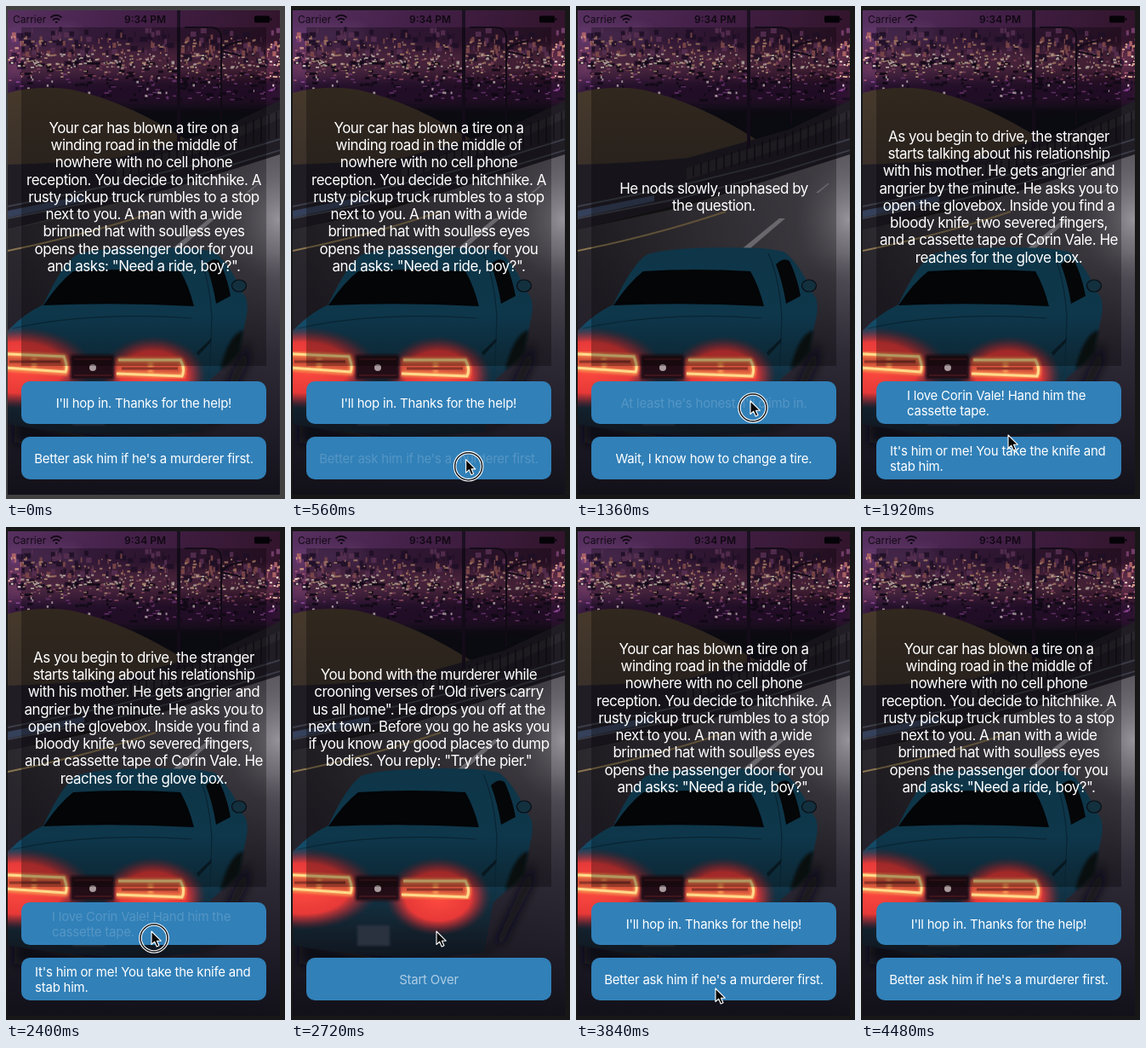
Animation of 328 by 578 pixels, one loop 4.8 s. Source, as an HTML page:

```html
<!DOCTYPE html>
<html lang="en">
<head>
<meta charset="utf-8">
<title>Hitchhike story</title>
<style>
html, body { margin: 0; width: 100%; height: 100%; overflow: hidden; background: #171717; }
svg { display: block; width: 328px; height: 578px; font-family: Inter, Roboto, sans-serif; }
.label { font-size: 17px; letter-spacing: -.5px; fill: #fff; text-anchor: middle; }
.title { font-size: 15px; letter-spacing: -.23px; fill: #fff; }
.status { font-size: 12px; fill: #08050b; }
</style>
</head>
<body>
<svg id="stage" viewBox="0 0 328 578" xmlns="http://www.w3.org/2000/svg">
  <defs>
    <clipPath id="screen"><rect x="2" y="5" width="320" height="568"/></clipPath>
    <linearGradient id="sky" x2="1" y2=".25">
      <stop offset="0" stop-color="#57305f"/><stop offset=".45" stop-color="#432048"/>
      <stop offset="1" stop-color="#31142a"/>
    </linearGradient>
    <linearGradient id="hill" x2="0" y2="1">
      <stop offset="0" stop-color="#46392b"/><stop offset="1" stop-color="#332b29"/>
    </linearGradient>
    <linearGradient id="road" gradientUnits="userSpaceOnUse" x1="20" y1="320" x2="322" y2="230">
      <stop offset="0" stop-color="#2a272d"/><stop offset=".5" stop-color="#444048"/><stop offset="1" stop-color="#5c5961"/>
    </linearGradient>
    <linearGradient id="dusk" x2="0" y2="1">
      <stop offset="0" stop-color="#211d2a" stop-opacity="0"/><stop offset=".42" stop-color="#211d2a" stop-opacity=".75"/>
      <stop offset="1" stop-color="#12111a"/>
    </linearGradient>
    <radialGradient id="glare">
      <stop offset="0" stop-color="#b5b3b8" stop-opacity=".65"/><stop offset=".5" stop-color="#9a989e" stop-opacity=".35"/>
      <stop offset="1" stop-color="#7c7980" stop-opacity="0"/>
    </radialGradient>
    <linearGradient id="body" gradientUnits="userSpaceOnUse" x1="0" y1="284" x2="0" y2="508">
      <stop offset="0" stop-color="#144c67"/><stop offset=".35" stop-color="#144e6b"/>
      <stop offset=".6" stop-color="#12384b"/><stop offset=".82" stop-color="#13232f"/><stop offset="1" stop-color="#0f141d"/>
    </linearGradient>
    <radialGradient id="glow">
      <stop offset="0" stop-color="#ff4c40"/><stop offset=".62" stop-color="#f73a37" stop-opacity=".93"/>
      <stop offset=".8" stop-color="#d02e34" stop-opacity=".5"/><stop offset="1" stop-color="#7a2230" stop-opacity="0"/>
    </radialGradient>
    <filter id="soft"><feGaussianBlur stdDeviation="1.6"/></filter>
    <filter id="haze" x="-30%" y="-30%" width="160%" height="160%"><feGaussianBlur stdDeviation="6"/></filter>
  </defs>

  <rect id="frame" width="328" height="578"/>
  <g clip-path="url(#screen)">
    <rect x="2" y="5" width="320" height="190" fill="url(#sky)"/>
    <g filter="url(#haze)">
      <path d="M0 50H324V80H0z" fill="#7c3f5c" opacity=".6"/>
      <path d="M0 24H85V44H0z" fill="#6e4278" opacity=".5"/>
      <path d="M0 88H324V114H0z" fill="#2b1532" opacity=".8"/>
      <path d="M90 116H330V170H90z" fill="#120c18" opacity=".95"/>
    </g>
    <g id="lights"></g>

    <path d="M2 102Q38 92 78 98Q146 113 222 163L232 176L2 246z" fill="url(#hill)"/>
    <path d="M2 186Q70 184 132 178L250 145L322 111V178L150 226L2 262z" fill="#201d25"/>
    <path d="M130 190L250 153L322 122V132L250 164L130 204z" fill="#2a262d"/>
    <path id="fence" stroke="#100d13" stroke-width="1.2" fill="none"/>
    <path d="M2 262L120 237L230 203L322 174V573H2z" fill="url(#road)"/>
    <path d="M2 235L120 211L230 184L322 156M2 249L120 226L230 197L322 169" stroke="#3c3e49" stroke-width="1.800" fill="none"/>
    <path d="M2 240L92 222V229L2 248z" fill="#35405a"/>
    <ellipse cx="320" cy="250" rx="62" ry="74" fill="url(#glare)"/>
    <path d="M2 287Q96 268 176 241" stroke="#8a7550" stroke-width="2" fill="none"/>
    <path d="M196 284L239 249L246 249L205 284zM282 219L296 208L298 208L285 219z" fill="#96949a"/>
    <rect x="2" y="290" width="320" height="283" fill="url(#dusk)"/>

    <path d="M203 5V167" stroke="#1b1022" stroke-width="4"/>
    <path d="M253 140V36Q252 25 240 25H210M253 53Q258 44 279 41M253 53L276 58" stroke="#190f1e" stroke-width="2" fill="none"/>

    <path d="M10 480Q120 525 236 496L285 392L284 418L250 486Q150 530 10 512z" fill="#0d0e15" filter="url(#haze)"/>
    <path d="M0 383Q20 361 44 350Q66 302 84 291Q110 283 178 283Q232 283 246 289Q264 304 277 335Q286 343 283 362L274 405Q256 425 238 440L227 499Q120 512 0 490z" fill="url(#body)"/>
    <path d="M44 351Q62 324 79 311Q140 307 205 311Q215 328 221 352Q130 347 44 351z" fill="#05070a"/>
    <path d="M235 303Q244 294 251 299Q260 318 264 340L247 349Q243 324 235 303z" fill="#07090c"/>
    <path d="M226 290Q239 318 242 365L239 440M8 378Q100 358 218 366" stroke="#0d3448" stroke-width="1.2" fill="none"/>
    <path d="M224 406L242 389L241 394L226 410z" fill="#0b222e"/>
    <ellipse cx="274" cy="328" rx="8.500" ry="7" fill="#1b4459" stroke="#0c141c" stroke-width="1.2"/>
    <path d="M254 417Q264 384 279 380L275 406Q263 422 252 426z" fill="#0c1219" filter="url(#soft)"/>

    <ellipse cx="14" cy="424" rx="88" ry="48" fill="url(#glow)"/>
    <ellipse cx="173" cy="433" rx="62" ry="46" fill="url(#glow)"/>
    <path d="M76 409H127V438H76z" fill="#241016" filter="url(#soft)"/>
    <path d="M80 414H124M80 433H124" stroke="#4a1a20" stroke-width="1.5"/>
    <path d="M0 406L70 410Q75 423 71 431L0 427zM129 413H207Q214 424 209 435H130z" fill="#d8523a" filter="url(#soft)"/>
    <g fill="none">
      <path d="M0 408L68 411Q73 423 70 430L0 425M33 409V427M132 415H205Q211 425 207 434L130 431M170 415V433" stroke="#ff9d55" stroke-width="6" opacity=".8" filter="url(#soft)"/>
      <path d="M0 408L68 411Q73 423 70 429L0 424M132 415H205Q211 425 207 434L130 431" stroke="#ffd98c" stroke-width="3"/>
    </g>
    <path d="M4 417H64M136 425H202" stroke="#8e3428" stroke-width="3"/>
    <circle cx="102" cy="424" r="4" fill="#a89a9d"/>
    <path d="M78 467H116V491H78z" fill="#2a333f" filter="url(#soft)"/>

    <rect x="18" y="25" width="288" height="397" fill="#000" opacity=".3"/>
    <g opacity=".85">
      <text class="status" x="8" y="19.500">Carrier</text>
      <text class="status" x="163.500" y="19.500" text-anchor="middle" font-weight="600">9:34 PM</text>
      <path d="M52.500 13.500Q59 8 65.500 13.500M55 16.500Q59 13 63 16.500M58 19H60.500" fill="none" stroke="#08050b" stroke-width="2"/>
    </g>
    <rect x="292" y="11.500" width="18" height="8" rx="1.500" fill="#050307"/>
    <path d="M311.500 14v3" stroke="#050307" stroke-width="1.500"/>

    <g id="labels"></g>
    <g id="buttons"></g>
  </g>

  <g id="cursor">
    <g id="ring" fill="none">
      <circle cx="3" cy="8" r="16" stroke="#fff" stroke-width="3.600"/>
      <circle cx="3" cy="8" r="16" stroke="#15181c" stroke-width="1.500"/>
    </g>
    <path d="M0 0V15.500L3.700 12.200L6.200 18L9 16.800L6.500 11.200H11.200z" fill="#080808" stroke="#fff" stroke-width="1.100" stroke-linejoin="round"/>
  </g>
</svg>
<script>
const LOOP = 4800;
const get = id => document.getElementById(id);

function add(parent, tag, attrs, text) {
  const node = document.createElementNS('http://www.w3.org/2000/svg', tag);
  for (const key in attrs) node.setAttribute(key, attrs[key]);
  if (text) node.textContent = text;
  parent.appendChild(node);
  return node;
}

const song = 'I love Corin Vale! Hand him the|cassette tape.';
const pages = [
  { label: 'Your car has blown a tire on a|winding road in the middle of|nowhere with no cell phone|reception. You decide to hitchhike. A|rusty pickup truck rumbles to a stop|next to you. A man with a wide|brimmed hat with soulless eyes|opens the passenger door for you|and asks: "Need a ride, boy?".',
    titles: ["I'll hop in. Thanks for the help!", "Better ask him if he's a murderer first."] },
  { label: 'He nods slowly, unphased by|the question.',
    titles: ["At least he's honest. I'll climb in.", 'Wait, I know how to change a tire.'] },
  { label: 'As you begin to drive, the stranger|starts talking about his relationship|with his mother. He gets angrier and|angrier by the minute. He asks you to|open the glovebox. Inside you find a|bloody knife, two severed fingers,|and a cassette tape of Corin Vale. He|reaches for the glove box.',
    titles: [song, "It's him or me! You take the knife and|stab him."] },
  { label: 'You bond with the murderer while|crooning verses of "Old rivers carry|us all home". He drops you off at the|next town. Before you go he asks you|if you know any good places to dump|bodies. You reply: "Try the pier."',
    titles: [song, 'Start Over'] }
];

// Each tap: pressed, released, button, page it opens
const taps = [
  { down: -9e3, up: -9e3, button: -1, page: 0 },
  { down: 360, up: 600, button: 1, page: 1 },
  { down: 1240, up: 1520, button: 0, page: 2 },
  { down: 2400, up: 2440, button: 0, page: 3 },
  { down: 3280, up: 3440, button: 1, page: 0 }
];
const rings = [[360, 680], [1240, 1540], [2400, 2540], [3280, 3580]];

// Pointer path: time, x, y
const path = [
  [160, 222, 582], [400, 206, 532], [800, 205, 531], [1160, 205, 463], [1540, 205, 463],
  [1920, 173, 503], [2080, 172, 502], [2240, 171, 474], [2760, 171, 474], [2960, 166, 538],
  [3040, 163, 546], [3200, 163, 546], [3360, 164, 541], [4240, 164, 541], [4480, 160, 582]
];

function randomizer(seed) {
  return () => (seed = (seed * 16807) % 2147483647) / 2147483647;
}

function drawCity() {
  const rnd = randomizer(4211);
  // Colour, count, top, height, largest width, thickness
  const bands = [
    ['#2a1534', 90, 27, 45, 10, 6], ['#7c4374', 55, 28, 30, 6, 6], ['#b66a68', 45, 34, 24, 4, 6],
    ['#150c1c', 130, 66, 46, 9, 3], ['#b5607c', 110, 50, 38, 4, 1.8], ['#e3a78a', 100, 36, 34, 4, 2.2],
    ['#fff0e2', 110, 56, 18, 3, 2], ['#ffd3ae', 80, 60, 24, 3, 1.7], ['#92499a', 75, 80, 30, 5, 1.6],
    ['#ffe6ee', 18, 82, 26, 2, 2.8]
  ];
  for (const [color, count, top, height, wide, thick] of bands) {
    let d = '';
    for (let i = 0; i < count; i++) {
      const x = 2 + rnd() * 320, y = top + rnd() * height;
      d += `M${x.toFixed(1)} ${y.toFixed(1)}h${(1 + rnd() * wide).toFixed(1)}`;
    }
    add(get('lights'), 'path', { d, stroke: color, 'stroke-width': thick, opacity: .85 });
  }
  let posts = '';
  for (let x = 138; x < 322; x += 9) {
    const y = 190 - (x - 130) * .35;
    posts += `M${x} ${y}v${12 + (x - 130) * .1}`;
  }
  get('fence').setAttribute('d', posts);
}

function buildPages() {
  const buttons = [440, 505].map(y => {
    const g = add(get('buttons'), 'g', {});
    add(g, 'rect', { x: 18, y, width: 288, height: 50, rx: 10, fill: '#3180b8' });
    return g;
  });
  for (const page of pages) {
    const lines = page.label.split('|');
    page.node = add(get('labels'), 'g', { class: 'label' });
    lines.forEach((line, i) => {
      const y = 229.8 + (i - (lines.length - 1) / 2) * 20.25;
      add(page.node, 'text', { x: 162, y }, line);
    });
    page.titleNodes = page.titles.map((title, b) => {
      const parts = title.split('|'), mid = [465, 530][b];
      const g = add(buttons[b], 'g', { class: 'title' });
      if (parts.length === 1) {
        add(g, 'text', { x: 162, y: mid + 5.5, 'text-anchor': 'middle' }, title);
      } else {
        parts.forEach((part, i) => add(g, 'text', { x: b ? 34 : 54, y: mid - 3.5 + i * 18 }, part));
      }
      return g;
    });
  }
  return buttons;
}

const clamp = v => Math.max(0, Math.min(1, v));
const show = (node, on) => node.setAttribute('display', on ? 'inline' : 'none');

function pointer(t) {
  const i = path.findIndex(key => key[0] > t);
  if (i < 1) return path[0].slice(1);
  const [t0, x0, y0] = path[i - 1], [t1, x1, y1] = path[i];
  const k = (t - t0) / (t1 - t0), e = k * k * (3 - 2 * k);
  return [x0 + (x1 - x0) * e, y0 + (y1 - y0) * e];
}

function render(t) {
  let n = 0;
  while (n + 1 < taps.length && taps[n + 1].up <= t) n++;
  const last = taps[n], next = taps[n + 1];
  const before = n ? taps[n - 1].page : 0;
  const age = t - last.up, fading = age < 160;

  pages.forEach((page, p) => {
    show(page.node, p === last.page);
    page.titleNodes.forEach((node, b) => {
      let alpha = 0;
      if (fading && p === before) alpha = (1 - age / 160) * (b === last.button ? .25 : 1);
      if (!fading && p === last.page) alpha = clamp((age - 160) / 200);
      if (next && t >= next.down && next.button === b) alpha *= .17;
      node.setAttribute('opacity', alpha);
    });
  });
  show(buttons[0], last.page !== 3);

  const [x, y] = pointer(t);
  get('cursor').setAttribute('transform', `translate(${x} ${y})`);
  show(get('cursor'), t >= 160 && t < 4480);
  show(get('ring'), rings.some(([from, to]) => t >= from && t < to));
  get('frame').setAttribute('fill', t < 160 ? '#414141' : '#171717');
}

drawCity();
const buttons = buildPages();
const start = performance.now();
function tick() {
  render((performance.now() - start) % LOOP);
  requestAnimationFrame(tick);
}
tick();
</script>
</body>
</html>
```
